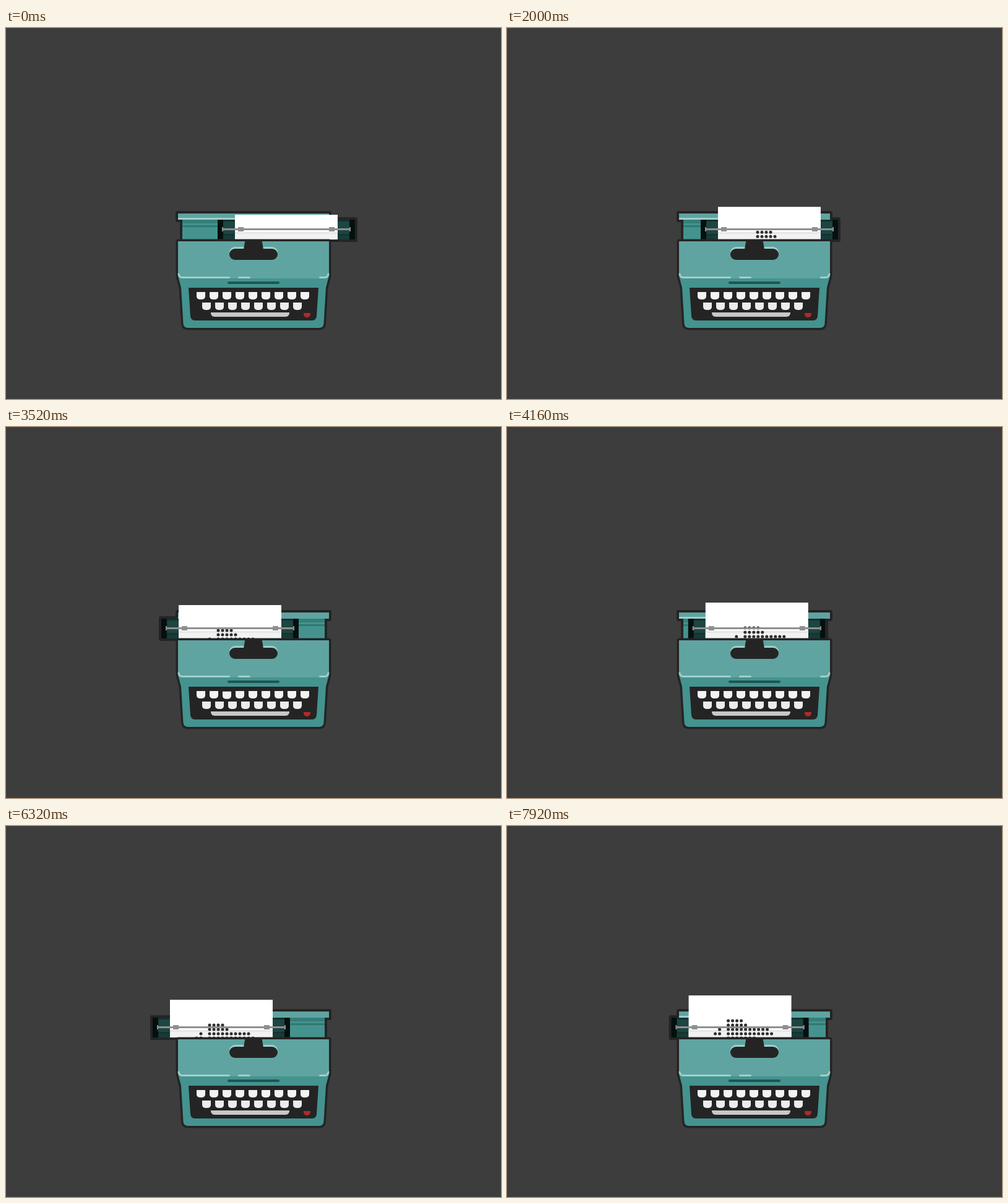
Write an HTML page with a canvas that moves like this. It is 800 by 600 pixels and loops after 8 s.

```html
<!DOCTYPE html>
<html lang="en">
<head>
<meta charset="utf-8">
<title>Typewriter</title>
<style>
  html, body { margin: 0; width: 100%; height: 100%; overflow: hidden; background: #3d3d3d; }
  canvas { display: block; }
</style>
</head>
<body>
<canvas id="stage" width="800" height="600"></canvas>
<script>
const ctx = document.getElementById('stage').getContext('2d');
const LOOP = 8000, TICK = 80, PITCH = 7, PRINT_X = 399, PAPER_TOP = 302;
const INK = '#242424', TEAL = '#44938f', PANEL = '#5fa4a1', LIGHT = '#a0cfcb';

// One letter per stroke: a-i top keys, j-q lower keys, _ space, - no key seen.
// Times are in ticks; first is the paper offset of the first column.
const rows = [
  { first: 64, start: 3.56, end: 10.2, keys: 'dmbk' },
  { first: 64, start: 12.825, end: 20.75, keys: 'fcgbh' },
  { first: 50, start: 26, end: 45.9, keys: 'e_kgbnpdlocf' },
  { first: 43, start: 56.4, end: 79.6, keys: 'bl_dfmgokcpeh-' },
  { first: 64, start: 88.35, end: 101.6, keys: 'nclgod-k' }
];

const mix = (a, b, t) => a + (b - a) * t;

function pose(tick) {
  const r = rows.findLastIndex(row => row.start <= tick);
  if (r < 0) {
    return { x: PRINT_X - mix(29, rows[0].first, tick / rows[0].start), top: PAPER_TOP, r: 0, typed: 0, press: 0 };
  }
  const { first, start, end, keys } = rows[r];
  if (tick >= end) {
    const next = rows[r + 1];
    const q = (tick - end) / (next.start - end);
    const last = first + PITCH * (keys.length - 1);
    return { x: PRINT_X - mix(last, next.first, q), top: PAPER_TOP - PITCH * (r + q), r, typed: keys.length, press: 0 };
  }
  const u = (tick - start) / (end - start) * keys.length;
  const k = Math.floor(u), phase = u - k;
  const lag = k ? Math.max(0, 1 - phase / 0.47) : 0;
  return {
    x: PRINT_X - first - PITCH * (k - lag),
    top: PAPER_TOP - PITCH * r,
    r,
    typed: k + (phase >= 0.35 ? 1 : 0),
    key: keys[k],
    press: 2 * Math.max(0, Math.min((phase - 0.2) / 0.4, (1 - phase) / 0.4, 1))
  };
}

function box(color, x, y, w, h, radius = 0) {
  ctx.fillStyle = color;
  ctx.beginPath();
  ctx.roundRect(x, y, w, h, radius);
  ctx.fill();
}

function shape(d, color, outline = 0) {
  const path = new Path2D(d);
  if (outline) {
    ctx.strokeStyle = INK;
    ctx.lineWidth = outline;
    ctx.lineJoin = 'round';
    ctx.stroke(path);
  }
  ctx.fillStyle = color;
  ctx.fill(path);
}

function drawBack(x) {
  // Dark silhouettes first, so that the fills hide the inner outlines.
  box(INK, 274, 296, 252, 18, 3);
  box(INK, 281, 306, 238, 40);
  box(INK, x - 32, 306, 230, 40, 3);
  box(PANEL, 278, 300, 244, 10);
  box(LIGHT, 278, 307, 102, 3);
  box(TEAL, 285, 310, 230, 34);
  box('#357f7a', 285, 310, 230, 6);
  box('#2f7973', 285, 319, 230, 3);
}

function drawCarriage({ x, top, r, typed }) {
  box('#04100f', x - 28, 310, 222, 32);
  box('#1d4542', x - 19, 310, 204, 32);
  box('#14312f', x - 19, 310, 204, 3);
  box('#143431', x - 19, 333, 204, 3);
  box('#183b38', x - 19, 336, 204, 6);

  box('#fff', x, top, 166, 342 - top);
  box('#e7e7e7', x, 330, 166, 3);
  box('#f2f2f2', x, 333, 166, 9);

  ctx.fillStyle = '#302e30';
  for (let i = 0; i <= r; i++) {
    const { first, keys } = rows[i];
    const count = i < r ? keys.length : typed;
    for (let k = 0; k < count; k++) {
      if (keys[k] === '_') continue;
      ctx.beginPath();
      ctx.arc(x + first + PITCH * k, top + 41 + PITCH * i, 2.5, 0, 7);
      ctx.fill();
    }
  }

  const grey = '#8f8f8f';
  box(grey, x - 21, 324, 208, 3);
  for (const dx of [-21, 185]) box(grey, x + dx, 322, 2, 7);
  for (const dx of [5, 152]) box(grey, x + dx, 322, 9, 7);
}

function drawFront() {
  shape('M278 345H522V401L517 420L513.5 478Q513 485 506 485H294Q287 485 286.5 478L283 420L278 401Z', TEAL, 7);
  box(PANEL, 278, 345, 244, 60, [0, 0, 6, 6]);

  ctx.strokeStyle = LIGHT;
  ctx.lineWidth = 3;
  ctx.lineCap = 'round';
  ctx.stroke(new Path2D('M279 398Q280 403.5 285 403.5H360.5M376.5 403.5H393.5M507.5 403.5H515Q520 403.5 521 398'));

  box(LIGHT, 361, 354, 78, 18, 9);
  box(INK, 361, 357, 78, 18, 9);
  shape('M386 346Q386.5 343 389 343H411Q413.5 343 414 346L416 358H384Z', INK);
  box('#1d5653', 358, 410, 84, 4, 2);
  shape('M295 420H505L502 466Q501 473 495 473H305Q299 473 298 466Z', INK);
}

function drawKeys({ key, press }) {
  for (let i = 0; i < 17; i++) {
    const low = i > 8;
    const x = low ? 317 + 21 * (i - 9) : 308 + 21 * i;
    const down = key === String.fromCharCode(97 + i) ? press : 0;
    box(low ? '#ececec' : '#f3f3f3', x, (low ? 444 : 427) + down, 14, 12, [0, 0, 5, 5]);
  }
  box('#c8c8c8', 331, 460 + (key === '_' ? press / 2 : 0), 127, 7, [0, 0, 6, 6]);
  box('#b02a2a', 481, 461, 11, 7, [0, 0, 5.5, 5.5]);
}

function draw(now) {
  const p = pose(Math.floor(now % LOOP / TICK));
  box('#3d3d3d', 0, 0, 800, 600);
  drawBack(p.x);
  drawCarriage(p);
  drawFront();
  drawKeys(p);
}

let begin;
function loop(now) {
  begin ??= now;
  draw(now - begin);
  requestAnimationFrame(loop);
}
draw(0);
requestAnimationFrame(loop);
</script>
</body>
</html>
```
